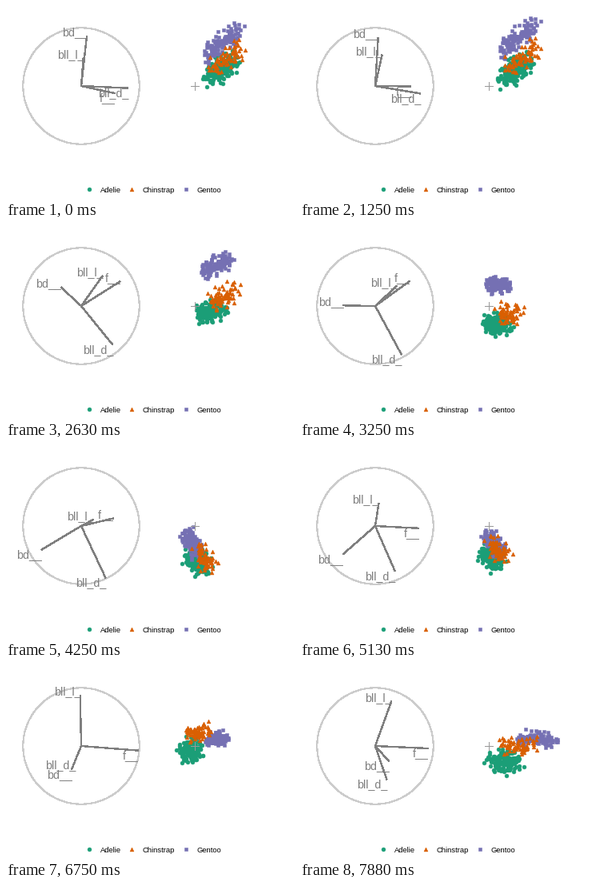
Animation, 360 px wide and 240 px high, one loop 8 s. Source, as a matplotlib script:

```python
import numpy as np
import matplotlib.pyplot as plt
from matplotlib.animation import FuncAnimation
from matplotlib.patches import Circle

W, H, DPI = 360, 240, 120
PX = 72 / DPI                      # one pixel in points
FRAMES, STEP = 64, 125
START = 8                          # the tour rests until this frame

GREY, RING, CROSS = "#7f7f7f", "#cccccc", "#999999"
HUB, RADIUS = np.array([94, 100]), 72.7
ORIGIN, SCALE = np.array([218.5, 99.5]), 73
FLIP = np.array([1, -1])           # screen y points down
SPREAD = 0.12                      # spread of each measurement

plt.rcParams["font.family"] = "Liberation Sans"

# Bill length, bill depth, flipper length and body mass, each scaled to 0..1
LABELS = ["bll_l_", "bll_d_", "f__", "bd__"]

# name, colour, marker, size, legend x, count, correlation, mean bird
SPECIES = [
    ("Adelie", "#1b9e77", "o", 4.9, 104, 151, 0.6, [.24, .62, .30, .28]),
    ("Gentoo", "#7570b3", "s", 4.9, 225, 123, 0.83, [.56, .22, .77, .66]),
    ("Chinstrap", "#d95f02", "^", 4.9, 157, 68, 0.76, [.61, .63, .40, .29]),
]

# Views the tour visits: frame -> tip of each spoke as x + iy
STOPS = {
    8: [.04 + .48j, .78 - .03j, .56 - .12j, .10 + .85j],
    16: [.30 + .57j, .65 - .43j, .67 + .29j, -.15 + .60j],
    26: [.37 + .34j, .45 - .82j, .59 + .42j, -.55 + .01j],
    36: [.16 + .04j, .42 - .88j, .53 + .04j, -.70 - .49j],
    41: [.06 + .39j, .34 - .77j, .75 - .04j, -.55 - .48j],
    54: [-.01 + .88j, -.10 - .24j, .98 - .07j, -.17 - .41j],
    63: [.28 + .76j, .20 - .57j, .91 - .04j, .24 - .26j],
}


def orthonormal(m):
    u, _, vt = np.linalg.svd(m, full_matrices=False)
    return u @ vt


TIMES = list(STOPS)
VIEWS = [orthonormal(np.column_stack([np.real(s), np.imag(s)]))
         for s in STOPS.values()]


def view(frame):
    """Rotate evenly from one stop to the next."""
    t = max(frame, START)
    k = min(np.searchsorted(TIMES, t, side="right") - 1, len(TIMES) - 2)
    u = (t - TIMES[k]) / (TIMES[k + 1] - TIMES[k])
    a, b = VIEWS[k], VIEWS[k + 1]
    angle = np.arccos(np.sum(a * b) / 2)
    return orthonormal(np.sin((1 - u) * angle) * a + np.sin(u * angle) * b)


def sample(rng, n, corr, mean):
    """Birds whose measurements share a size factor that depends on sex."""
    sex = np.where(np.arange(n) % 2, 1, -1)
    size = 0.75 * sex + 0.66 * rng.standard_normal(n)
    own = np.clip(rng.standard_normal((n, 4)), -2.3, 2.3)
    z = corr * size[:, None] + np.sqrt(1 - corr ** 2) * own
    return np.clip(mean + SPREAD * z, 0, 1)


def dots(x, y, colour, marker, size):
    line, = ax.plot(x, y, marker, ms=size * PX, mfc=colour, mec=colour,
                    mew=0.5 * PX, antialiased=False, zorder=2)
    return line


def stroke(x, y, colour, width):
    line, = ax.plot(x, y, color=colour, lw=width * PX, antialiased=False,
                    solid_capstyle="butt", zorder=3)
    return line


fig = plt.figure(figsize=(W / DPI, H / DPI), dpi=DPI, facecolor="white")
ax = fig.add_axes([0, 0, 1, 1])
ax.set_xlim(0, W)
ax.set_ylim(H, 0)
ax.axis("off")

ax.add_patch(Circle(HUB, RADIUS, fill=False, ec=RING, lw=1.25 * PX,
                    antialiased=False))
stroke([231, 241], [100, 100], CROSS, 1)
stroke([236, 236], [95, 105], CROSS, 1)

rng = np.random.default_rng(7)
clouds = []
for name, colour, marker, size, x, count, corr, mean in SPECIES:
    birds = sample(rng, count, corr, mean)
    clouds.append((birds, dots([], [], colour, marker, size)))
    dots([x], [228.9], colour, marker, size)
    ax.text(x + 13.8, 232.6, name, color="black", size=9.45 * PX)

spokes = [stroke([], [], GREY, 1.35) for _ in LABELS]
tags = [ax.text(0, 0, s, color=GREY, size=14.2 * PX, ha="right", zorder=4)
        for s in LABELS]


def draw(frame):
    v = view(frame)
    for birds, line in clouds:
        line.set_data(*(ORIGIN + SCALE * FLIP * (birds @ v)).T)
    for tip, spoke, tag in zip(v, spokes, tags):
        x, y = HUB + RADIUS * FLIP * tip
        spoke.set_data([HUB[0], x], [HUB[1], y])
        tag.set_position((x + 0.5, y if tip[1] >= 0 else y + 10.3))
    return [line for _, line in clouds] + spokes + tags


anim = FuncAnimation(fig, draw, frames=FRAMES, interval=STEP, repeat=True,
                     repeat_delay=0, blit=False)
plt.show()
```
